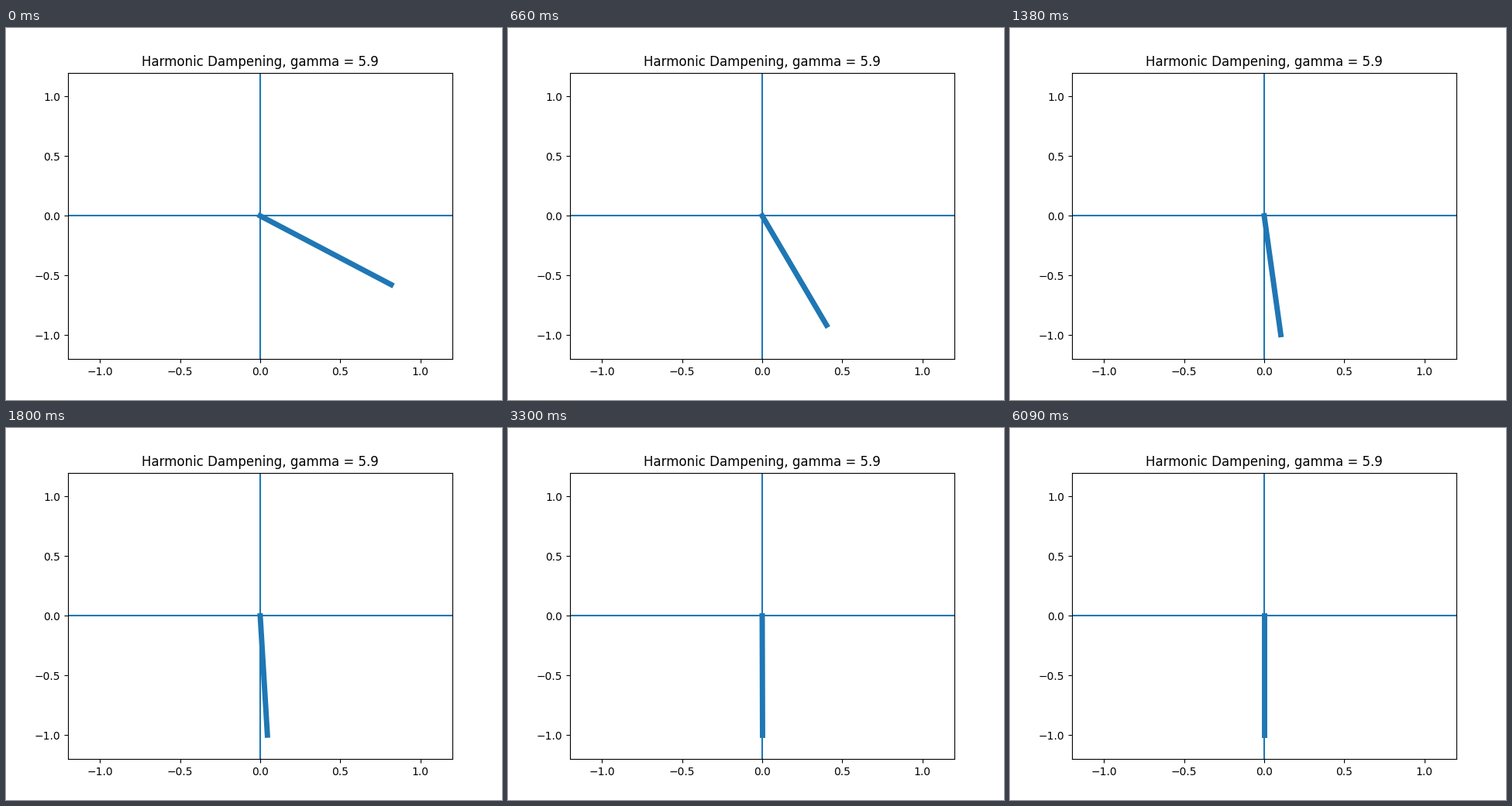
A matplotlib script that plays this animation: 640x480 px, repeating every 8000 ms.

```python
import math

import matplotlib.pyplot as plt
from matplotlib.animation import FuncAnimation

LOOP_MS = 8000
INTERVAL_MS = 20
STEP_MS = 60       # the pendulum moves once per step
REST_MS = 6080     # from here on it hangs exactly vertical
GAMMA = 5.9


def angle(ms):
    """Overdamped swing, measured from the downward vertical."""
    if ms >= REST_MS:
        return 0.0
    t = ms // STEP_MS * STEP_MS / 1000
    return 1.65 * math.exp(-2 * t) - 0.693 * math.exp(-4.9 * t)


fig, ax = plt.subplots(figsize=(6.4, 4.8), dpi=100)
ax.set_xlim(-1.2, 1.2)
ax.set_ylim(-1.2, 1.2)
ax.set_title(f"Harmonic Dampening, gamma = {GAMMA}")
ax.axhline(0, color="C0")
ax.axvline(0, color="C0")
rod, = ax.plot([], [], color="C0", linewidth=5)


def update(frame):
    theta = angle(frame * INTERVAL_MS)
    rod.set_data([0, math.sin(theta)], [0, -math.cos(theta)])
    return rod,


anim = FuncAnimation(fig, update, frames=LOOP_MS // INTERVAL_MS,
                     interval=INTERVAL_MS, repeat=True, repeat_delay=0)
plt.show()
```
